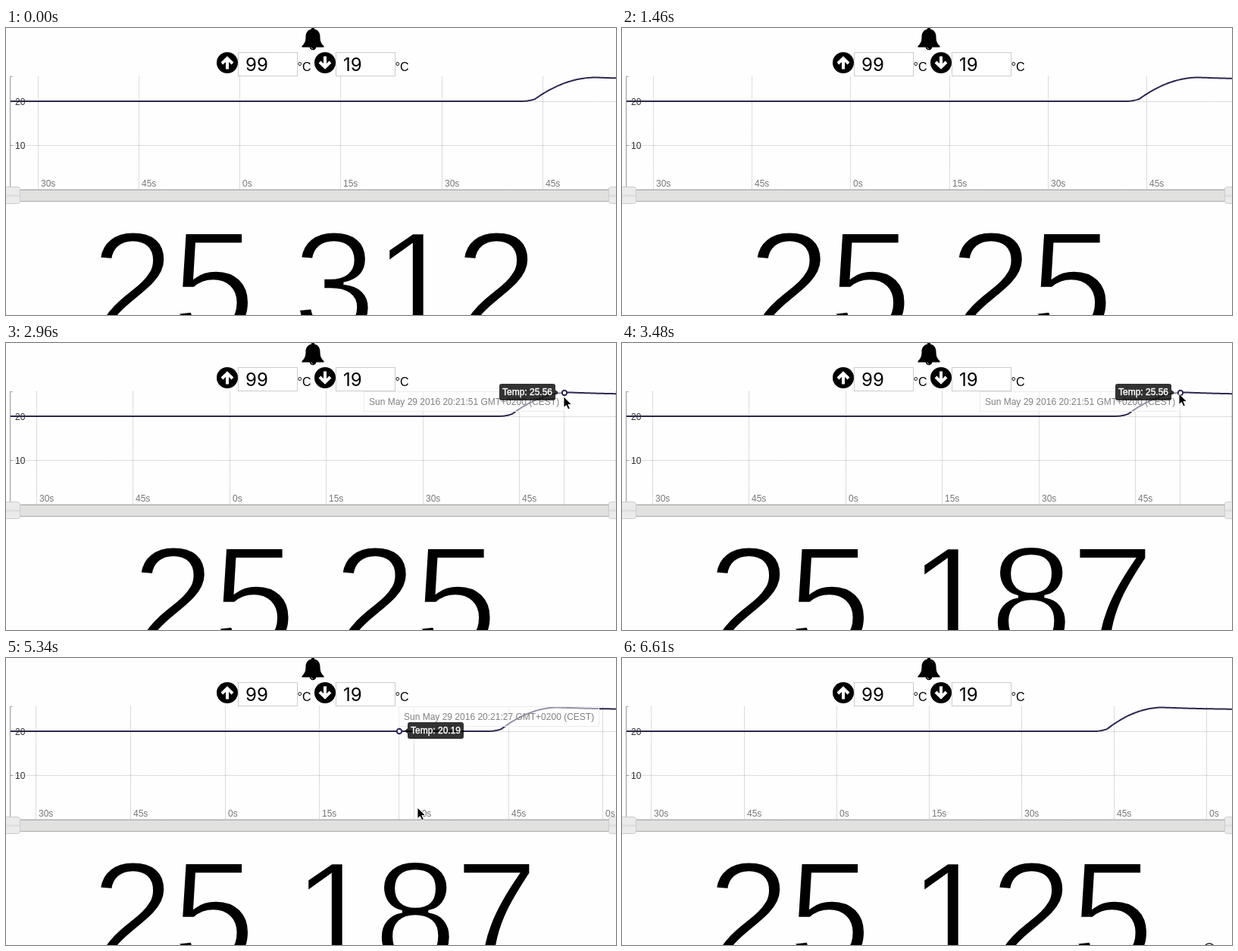
An HTML page for the animation above (6750 ms loop, 805 px wide and 380 px high).

```html
<!DOCTYPE html>
<html lang="en">
<head>
<meta charset="utf-8">
<title>Temperature monitor</title>
<style>
  html, body { margin: 0; width: 100%; height: 100%; overflow: hidden; background: #fefefe; }
  svg { display: block; width: 805px; height: 380px; font: 12px "Liberation Sans", Arial, sans-serif; }
  .grid path { stroke: #bbb; stroke-dasharray: 1 1; fill: none; }
  .grid text { fill: #777; }
  .axis { stroke: #999; fill: none; }
  .scale { fill: #333; }
  .field { fill: #fff; stroke: #ccc; }
  .value { font: 24px Inter, sans-serif; }
  .unit { font-size: 16px; }
  .curve { fill: none; stroke: #2d2750; stroke-width: 2; }
  .handle { fill: #ebebeb; stroke: #ccc; }
  /* background-coloured outline slims the numerals */
  #reading { font-size: 197px; letter-spacing: -2.6px; stroke: #fefefe; stroke-width: 3.6; }
  .arrow { fill: none; stroke: #fff; stroke-width: 4; }
  #date rect { fill: #fff; fill-opacity: .5; stroke: #ececec; }
  #date text { fill: #808080; }
  #tip rect, #tip path { fill: #000; fill-opacity: .8; }
  #tip text { fill: #fff; stroke: #fff; stroke-width: .4; }
</style>
</head>
<body>
<svg viewBox="0 0 805 380" xmlns="http://www.w3.org/2000/svg">
  <path d="M405-1q2 0 2 2.500c5 1 7.500 5 7.500 10c0 6 1.500 9 5 12.500q.5 1.500-1 1.500h-27q-1.500 0-1-1.500c3.500-3.500 5-6.500 5-12.500c0-5 2.500-9 7.500-10q0-2.500 2-2.500z"/>
  <path d="M400.700 25a4.300 4.300 0 0 0 8.600 0z"/>
  <path d="M402.700 25.500q.3 2 2.300 2.300" fill="none" stroke="#fff" stroke-width=".7"/>

  <circle cx="292" cy="46" r="14"/>
  <path class="arrow" d="M292 54.500V40M285 47l7-7 7 7"/>
  <rect class="field" x="306.500" y="32.500" width="78" height="31"/>
  <text class="value" x="316" y="57">99</text>
  <text class="unit" x="384.600" y="57">°C</text>

  <circle cx="421" cy="46" r="14"/>
  <path class="arrow" d="M421 37.500V52M414 45l7 7 7-7"/>
  <rect class="field" x="435.500" y="32.500" width="78" height="31"/>
  <text class="value" x="445" y="57">19</text>
  <text class="unit" x="513.600" y="57">°C</text>

  <g class="grid">
    <path d="M6 97.500H805M6 155.500H805M6 213.500H805"/>
    <g id="times"></g>
  </g>
  <path class="axis" d="M8.500 64.500H5.500V213M5.500 97.500H9M5.500 155.500H9"/>
  <path id="curve" class="curve"/>
  <text class="scale" x="12" y="102">20</text>
  <text class="scale" x="12" y="160">10</text>

  <rect x="-2" y="214.500" width="810" height="15" fill="#e1e1e0" stroke="#aaa"/>
  <rect class="handle" x="-4.500" y="210.500" width="23" height="22" rx="3"/>
  <rect class="handle" x="795.500" y="210.500" width="23" height="22" rx="3"/>
  <path d="M0 222H18M796 222H805" stroke="#dfdfdf" stroke-width="3"/>

  <text id="reading" y="406.500"></text>

  <g id="hover">
    <path d="M-.5 64V214" stroke="#000" stroke-opacity=".13"/>
    <g id="date"><rect x=".5" y="64.500" width="264" height="26"/><text x="7" y="82"></text></g>
    <g id="dot">
      <g id="tip">
        <rect y="-12" width="74" height="22" rx="3"/>
        <path></path>
        <text x="4" y="3"></text>
      </g>
      <circle r="3.200" fill="#fff" stroke="#2d2750" stroke-width="2"/>
    </g>
  </g>
  <path id="pointer" d="M0 0v14.500l3.400-3 2.400 5.300 2.500-1.100-2.400-5.200h4.600z" stroke="#fff" stroke-width=".9"/>
  <path id="ring" d="M768.500 384a6.500 6 0 0 1 13 0" fill="none" stroke="#222" stroke-width="1.500"/>
</svg>
<script>
const LOOP = 6750, STEP = 88.125, FIRST = 1460, EXIT = 5680;
const SAMPLE_START = 27.61, SAMPLE_GAP = 2.03;
const $ = s => document.querySelector(s);

const zoomTimes = [600, 2250, 4180, 6230];
const readingTimes = [1460, 3130, 5510];
const readings = ['25.312', '25.25', '25.187', '25.125'];

// [ms, x, y]
const pointerPath = [
  [1548, 765, 372], [2070, 765, 105], [2340, 741, 82], [2782, 737, 73], [3480, 735, 67],
  [3840, 752, 74], [4104, 742, 86], [4192, 652, 110], [4280, 617, 121], [4456, 572, 150],
  [4721, 572, 150], [4985, 519, 190], [5249, 522, 194], [5337, 543, 198], [5602, 670, 374]
];

const countPassed = (times, t) => times.filter(start => start <= t).length;
const show = (el, on) => el.style.display = on ? '' : 'none';
const move = (el, x, y) => el.setAttribute('transform', `translate(${x} ${y})`);
const tempY = temp => 214.7 - 5.83 * temp;

// Flat, a soft start, a decelerating rise, then slow cooling.
function tempAt(sec) {
  if (sec < 41.8) return 20.19;
  if (sec < 43.86) return 20.19 + .5 * ((sec - 41.8) / 2.06) ** 2;
  if (sec < 52.9) return 25.6 - 4.91 * ((52.9 - sec) / 9.04) ** 2;
  return 25.05 + .55 * Math.exp((52.9 - sec) / 9);
}

// The visible time span grows with each new reading.
function timeScale(zoom) {
  const perSec = 800 / (90.1 + 2.05 * zoom);
  const left = 2.85 + 4.44 * perSec;
  return {
    x: sec => left + (sec + 30) * perSec,
    sec: x => (x - left) / perSec - 30
  };
}

function drawChart(zoom) {
  const { x, sec } = timeScale(zoom);
  $('#times').innerHTML = [...Array(7).keys()].map(i => {
    const gx = Math.floor(x(i * 15 - 30)) + .5;
    return `<path d="M${gx} 64V213"/><text x="${gx + 3.5}" y="210">${(30 + i * 15) % 60}s</text>`;
  }).join('');
  let d = 'M6 ' + tempY(tempAt(0));
  for (let px = 600; px <= 808; px += 2) d += `L${px} ${tempY(tempAt(sec(px))).toFixed(2)}`;
  $('#curve').setAttribute('d', d);
}

function pointerAt(t) {
  const i = pointerPath.findLastIndex(p => p[0] <= t + 1);
  if (i < 0 || t > EXIT) return null;
  const a = pointerPath[i], b = pointerPath[i + 1];
  if (!b) return { x: a[1], y: a[2] };
  const k = Math.max(0, (t - a[0]) / (b[0] - a[0]));
  return { x: a[1] + (b[1] - a[1]) * k, y: a[2] + (b[2] - a[2]) * k };
}

function drawHover(mouse, zoom) {
  const on = mouse !== null && mouse.y < 214;
  show($('#hover'), on);
  if (!on) return;
  const scale = timeScale(zoom);
  const n = Math.round((scale.sec(mouse.x) - SAMPLE_START) / SAMPLE_GAP);
  const sec = SAMPLE_START + n * SAMPLE_GAP;
  const temp = Math.round(tempAt(sec) * 16) / 16; // sensor resolution
  const px = Math.round(scale.x(sec) + .3);
  const toRight = px < 541;
  move($('#hover'), px, 0);
  move($('#date'), toRight ? -1 : -265, 0);
  $('#date text').textContent = `Sun May 29 2016 20:21:${Math.floor(sec)} GMT+0200 (CEST)`;
  move($('#dot'), 0, Math.round(tempY(temp)));
  move($('#tip'), toRight ? 11 : -86, 0);
  $('#tip path').setAttribute('d', toRight ? 'M0-4v7l-4-3.5z' : 'M74-4v7l4-3.5z');
  $('#tip text').textContent = `Temp: ${temp.toFixed(2)}`;
}

function drawPointer(mouse) {
  show($('#pointer'), mouse !== null);
  if (mouse) move($('#pointer'), Math.round(mouse.x), Math.round(mouse.y));
}

let lastZoom;
function draw(t) {
  const zoom = countPassed(zoomTimes, t);
  if (zoom !== lastZoom) drawChart(lastZoom = zoom);
  const text = readings[countPassed(readingTimes, t)];
  $('#reading').textContent = text;
  $('#reading').setAttribute('x', text.length > 5 ? 112.5 : 166);

  // The pointer advances in steps; the readout trails it by one.
  const stepped = FIRST + Math.floor((t - FIRST + 12) / STEP) * STEP;
  drawHover(pointerAt(stepped - STEP), zoom);
  drawPointer(pointerAt(stepped));
  show($('#ring'), t >= 6610);
}

const start = performance.now();
function tick() {
  draw((performance.now() - start) % LOOP);
  requestAnimationFrame(tick);
}
tick();
</script>
</body>
</html>
```
